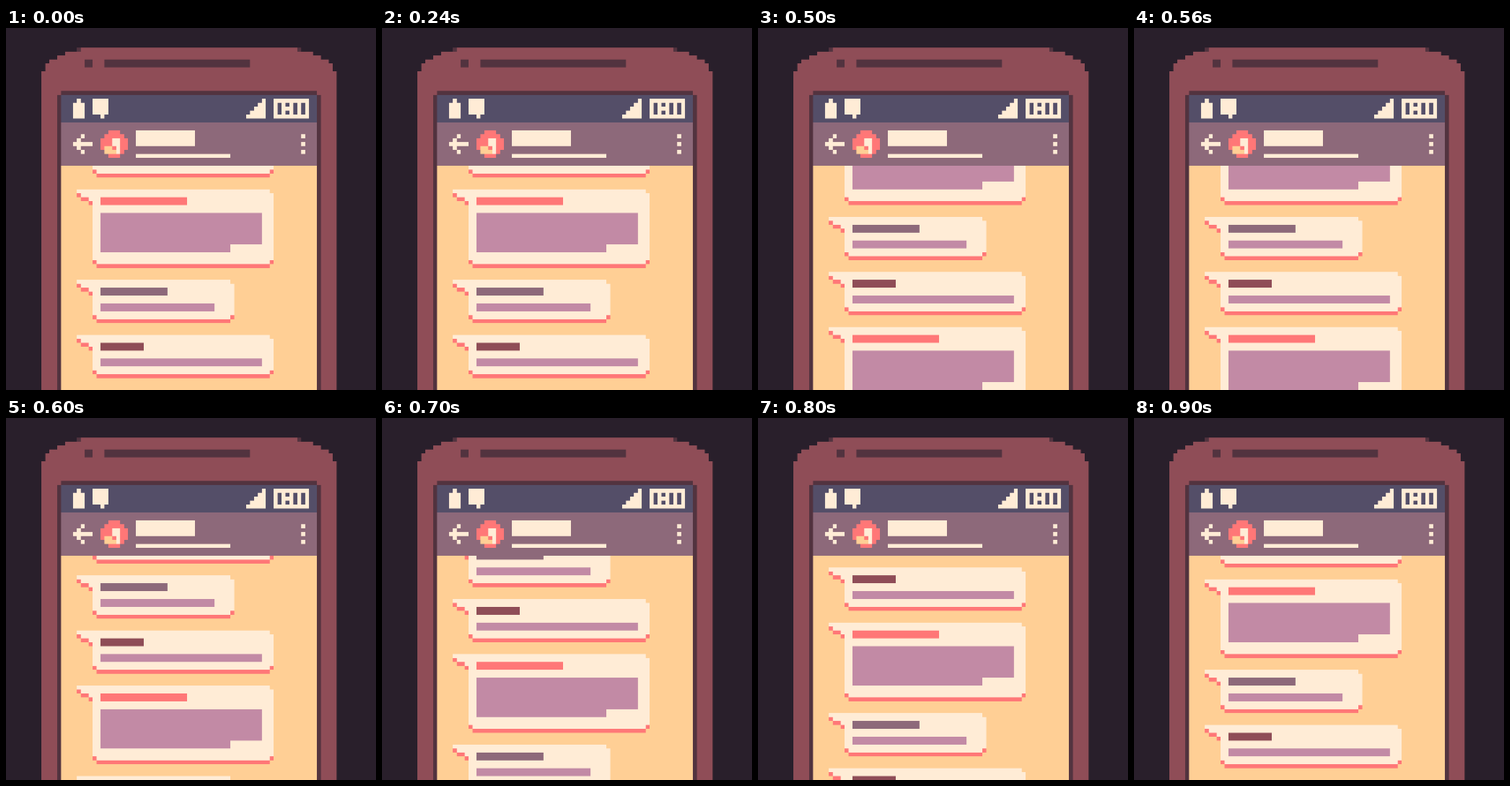
An HTML page with a canvas that plays this animation: 419x410 px, repeating every 1000 ms.

```html
<!DOCTYPE html>
<html lang="en">
<head>
<meta charset="utf-8">
<title>Chat scroll</title>
<style>
  html, body { margin: 0; width: 100%; height: 100%; overflow: hidden; background: #291f2b; }
  canvas { display: block; }
</style>
</head>
<body>
<canvas id="stage" width="419" height="410"></canvas>
<script>
const stage = document.getElementById('stage');
const view = stage.getContext('2d');
const COLS = 94, ROWS = 92, CELL = 8;

// The art is drawn on a whole-pixel grid, then scaled smoothly to the stage.
const art = document.createElement('canvas');
art.width = COLS * CELL;
art.height = ROWS * CELL;
const ctx = art.getContext('2d');
ctx.scale(CELL, CELL);

const NIGHT = '#291f2b', CASE = '#8f4d57', EDGE = '#52333f', SLATE = '#544e68',
      MAUVE = '#8d697a', CREAM = '#ffecd6', SAND = '#ffcf95', CORAL = '#ff7777', LILAC = '#c28aa5';

// Fills grid cells from (x0, y0) up to, not including, (x1, y1).
function box(color, x0, y0, x1 = x0 + 1, y1 = y0 + 1) {
  ctx.fillStyle = color;
  ctx.fillRect(x0, y0, x1 - x0, y1 - y0);
}

// One chat thread; rows inside a bubble are relative to its top.
const PERIOD = 51;
const bubbles = [
  { top: 41, right: 68, height: 19, bars: [[CORAL, 2, 46, 4], [LILAC, 6, 65, 14], [LILAC, 14, 57, 16]] },
  { top: 64, right: 58, height: 10, bars: [[MAUVE, 2, 41, 4], [LILAC, 6, 53, 8]] },
  { top: 78, right: 68, height: 10, bars: [[CASE, 2, 35, 4], [LILAC, 6, 65, 8]] }
];

function drawBubble({ right, height, bars }, y) {
  const bottom = y + height;
  box(CREAM, 18, y, right - 1, y + 1);
  box(CREAM, 19, y + 1, right, y + 2);
  box(CREAM, 21, y + 2, right, y + 3);
  box(CREAM, 22, y + 3, right, bottom);
  // Shaded underside of the tail and of the bubble
  box(CORAL, 18, y + 1);
  box(CORAL, 19, y + 2, 21, y + 3);
  box(CORAL, 21, y + 3);
  box(CORAL, 22, bottom - 1);
  box(CORAL, right - 1, bottom - 1);
  box(CORAL, 23, bottom, right - 1, bottom + 1);
  for (const [color, from, end, to] of bars) box(color, 24, y + from, end, y + to);
}

function drawCase() {
  box(NIGHT, 0, 0, COLS, ROWS);
  [18, 15, 13, 11, 10, 10].forEach((inset, i) => box(CASE, inset, 5 + i, 93 - inset, 6 + i));
  box(CASE, 9, 11, 84, ROWS);
  box(EDGE, 18, 5);
  box(EDGE, 74, 5);
  box(EDGE, 20, 8, 22, 10);
  box(EDGE, 25, 8, 62, 10);
  box(EDGE, 14, 16, 79, 17);
  box(EDGE, 13, 17, 80, ROWS);
}

function drawStatusBar() {
  box(SLATE, 14, 17, 79, 24);
  box(CREAM, 18, 18);
  box(CREAM, 17, 19, 20, 23);
  box(CREAM, 22, 18, 26, 22);
  box(CREAM, 24, 22);
  for (let i = 0; i < 5; i++) box(CREAM, 61 + i, 22 - i, 62 + i, 23);
  box(CREAM, 68, 18, 77, 23);
  for (const col of [69, 73, 75]) box(SLATE, col, 19, col + 1, 22);
  box(SLATE, 71, 19);
  box(SLATE, 71, 21);
}

const avatar = [
  '..RRR..',
  '.RRRRR.',
  'RRRCCRR',
  'RRRCCRR',
  'ROORCRR',
  '.OOOCR.',
  '..RRR..'
];
const avatarColors = { R: CORAL, C: CREAM, O: SAND };

function drawHeader() {
  box(MAUVE, 14, 24, 79, 35);
  box(CREAM, 17, 29, 22, 30);
  for (const i of [1, 2]) {
    box(CREAM, 17 + i, 29 - i);
    box(CREAM, 17 + i, 29 + i);
  }
  avatar.forEach((line, y) => [...line].forEach((key, x) => {
    if (key !== '.') box(avatarColors[key], 24 + x, 26 + y);
  }));
  box(CREAM, 33, 26, 48, 30);
  box(CREAM, 33, 32, 57, 33);
  for (const row of [27, 29, 31]) box(CREAM, 75, row);
}

function drawThread(scroll) {
  ctx.save();
  ctx.beginPath();
  ctx.rect(14, 35, 65, ROWS - 35);
  ctx.clip();
  box(SAND, 14, 35, 79, ROWS);
  for (const shift of [-PERIOD, 0, PERIOD]) {
    for (const bubble of bubbles) drawBubble(bubble, bubble.top + shift - scroll);
  }
  ctx.restore();
}

function draw(scroll) {
  drawCase();
  drawStatusBar();
  drawHeader();
  drawThread(scroll);
  view.imageSmoothingQuality = 'high';
  view.drawImage(art, 0, 0, stage.width, stage.height);
}

// Rest, five jumps of eight rows, then a last jump that completes the period.
function scrollAt(ms) {
  const t = ms % 1000;
  return t < 400 || t >= 900 ? 0 : 8 * Math.floor((t - 300) / 100);
}

let shown = -1;
function tick() {
  const scroll = scrollAt(performance.now());
  if (scroll !== shown) draw(shown = scroll);
  requestAnimationFrame(tick);
}
tick();
</script>
</body>
</html>
```
